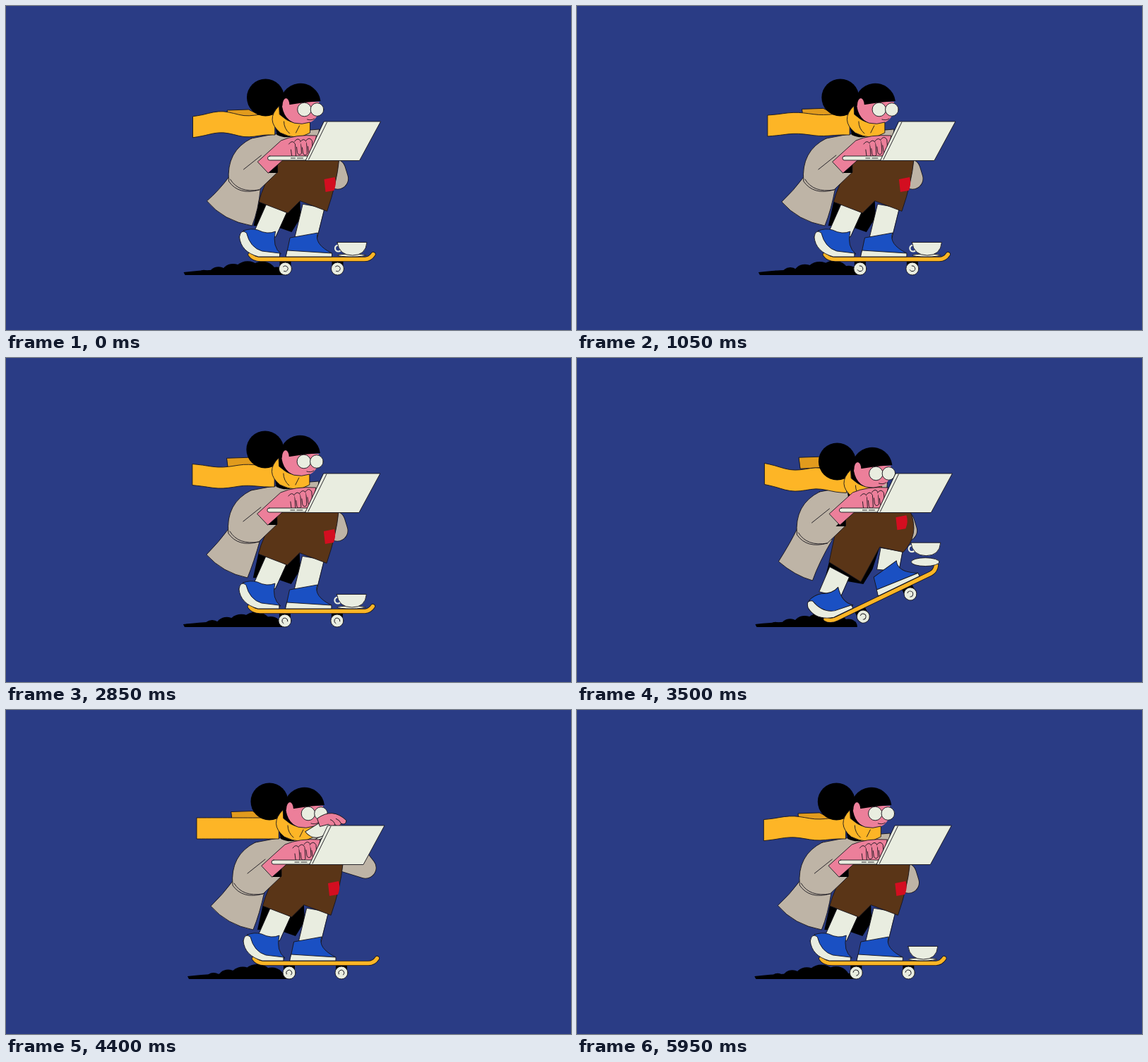
An HTML page that plays this animation: 800x460 px, repeating every 6 s.

```html
<!DOCTYPE html>
<html lang="en">
<head>
<meta charset="utf-8">
<title>Skater with laptop</title>
<style>
html, body { margin: 0; width: 100%; height: 100%; overflow: hidden; background: #2a3c85; }
svg { display: block; width: 100%; height: 100%; }
.ink { stroke: #17151c; stroke-width: .9; stroke-linejoin: round; stroke-linecap: round; }
.coat { fill: #beb4a6; }
.skin { fill: #ec7f9a; }
.white { fill: #e9ede0; }
.blue { fill: #1a50c3; }
.gold { fill: #fdb526; }
.brown { fill: #5a3517; }
.red { fill: #d30e20; }
.line { fill: none; }
.limb { fill: none; stroke-linecap: round; stroke-linejoin: round; }
</style>
</head>
<body>
<svg viewBox="0 0 800 460">
  <defs><clipPath id="floor"><rect x="200" y="330" width="300" height="52"/></clipPath></defs>
  <rect width="800" height="460" fill="#2a3c85"/>
  <g id="all">
    <g id="smoke" clip-path="url(#floor)"><path d="M252 378 Q300 372 394 374 V382 H254Z"/></g>
    <g id="sleeve">
      <path id="sleeveInk" class="limb" stroke="#17151c" stroke-width="31"/>
      <path id="sleeveFill" class="limb" stroke="#beb4a6" stroke-width="29.4"/>
    </g>
    <path id="lining"/>
    <path id="flap" class="coat ink"/>
    <path id="sockBack" class="white ink"/>
    <path id="sockFront" class="white ink"/>
    <g id="board">
      <path d="M388 362h16v8h-16zM462 362h16v8h-16z"/>
      <g id="wheels"></g>
      <path id="deckInk" class="limb" stroke="#17151c" stroke-width="7"/>
      <path id="deckFill" class="limb" stroke="#fdb526" stroke-width="5.4"/>
      <path class="blue ink" d="M337 319 Q347 315 357 318 Q371 325 382 320 Q377 342 390 352 H356 Q340 342 337 319Z"/>
      <path class="white ink" d="M331 328 Q333 316 341 322 Q346 343 363 348 L388 351 V356 H358 Q333 349 331 328Z"/>
      <g id="shoe">
        <path class="blue ink" d="M403 329 Q420 326 442 322 Q436 338 462 351 L399 348Z"/>
        <path class="white ink" d="M399 347 L462 351 V356 H397Z"/>
      </g>
    </g>
    <path id="trousers" class="brown ink"/>
    <path id="patch" class="red" d="M451 246 L466 243 Q469 252 465 262 L453 264Z"/>
    <g id="body">
      <path class="coat ink" d="M348 188 Q396 178 444 175 L441 215 H385 V236 L359 261 Q330 269 316 249 Q312 206 348 188Z"/>
      <path class="line ink" d="M337 232 L362 212 M318 246 Q330 266 359 261"/>
      <path d="M371 237 L385 223 V237Z"/>
    </g>
    <path id="flutter" fill="#e19b1d" class="ink"/>
    <path id="tail" class="gold ink"/>
    <g id="head">
      <circle cx="368" cy="130" r="26.500"/>
      <path d="M378 148 L398 138 L412 180 Q402 191 384 183Z"/>
      <path class="skin" d="M391 136 H444 L442 154 Q436 168 416 168 Q392 164 391 136Z"/>
      <path d="M389 142 A28.500 28.500 0 0 1 446 135 Q425 136 403 140Z"/>
      <ellipse class="skin" cx="397" cy="141" rx="5" ry="10"/>
      <path class="line ink" d="M427 161 Q433 163 437 160"/>
      <circle class="white ink" cx="423" cy="147" r="9.800"/>
      <circle class="white ink" cx="441" cy="147" r="9.300"/>
      <path class="gold ink" d="M387 142 Q367 162 389 180 Q412 192 431 180 V165 Q408 173 388 154Z"/>
      <path class="line ink" d="M394 164 Q394 174 402 181 M416 170 L411 180"/>
    </g>
    <path id="forearm" class="limb" stroke="#ec7f9a" stroke-width="20"/>
    <g id="cup">
      <ellipse id="saucer" class="white ink" rx="20"/>
      <circle id="handle" class="line" cx="-19" cy="-1" r="4.500" stroke="#e9ede0" stroke-width="2.200"/>
      <path class="white ink" d="M-20.500 -9.500 H21.500 Q20 9 1 9 Q-18 9 -20.500 -9.500Z"/>
    </g>
    <g id="hand">
      <path class="skin ink" d="M-16 -8 Q8 -20 24 2 Q22 9 16 5 Q12 11 7 5 Q2 9 -2 3 L-14 4Z"/>
      <path class="line ink" d="M16 5 Q15 0 10 -3 M7 5 Q7 0 2 -3"/>
    </g>
    <g id="desk">
      <path class="skin ink" d="M357 221 L390 191 Q410 182 440 184 L434 214 H398 L372 237Z"/>
      <g id="fingers" class="skin ink"></g>
      <rect class="white ink" x="371" y="213" width="60" height="6" rx="3"/>
      <path class="line ink" d="M404 216 H410 M413 216 H421"/>
      <path class="white ink" d="M451 164 H531 L501 219.500 H425Z"/>
      <path class="line ink" d="M455 165 L429 218"/>
    </g>
  </g>
</svg>
<script>
const LOOP = 6000, STEP = 50, FLUTTER = 750, TAU = 2 * Math.PI;
const PIVOT = [396, 373], TILT = -26;
const $ = id => document.getElementById(id);
const attr = (id, name, v) => $(id).setAttribute(name, v);
const move = (id, x, y, rot = 0, [cx, cy] = [0, 0]) =>
  attr(id, 'transform', `translate(${x} ${y}) rotate(${rot} ${cx} ${cy})`);

const mix = (a, b, k) => a + (b - a) * k;
const part = (t, a, b) => Math.min(1, Math.max(0, (t - a) / (b - a)));
const ramp = (t, a, b) => { const k = part(t, a, b); return k * k * (3 - 2 * k); };
const bump = (t, a, b) => Math.sin(Math.PI * part(t, a, b));

const poly = pts => 'M' + pts.map(p => p.join(' ')).join('L') + 'Z';
const polar = (r, deg) => [r * Math.cos(deg * TAU / 360), r * Math.sin(deg * TAU / 360)];

// Smooth line through the midpoints
function wavy(pts) {
  let d = `${pts[0]}`;
  for (let i = 1; i < pts.length - 1; i++) {
    const [x, y] = pts[i], [u, v] = pts[i + 1];
    d += `Q${x} ${y} ${(x + u) / 2} ${(y + v) / 2}`;
  }
  return d + `L${pts[pts.length - 1]}`;
}

// Both ends of a trouser cuff
function cuff([x, y], width, deg) {
  const [dx, dy] = polar(width / 2, deg);
  return [[x + dx, y + dy], [x - dx, y - dy]];
}

function add(parent, tag, props = {}) {
  const el = document.createElementNS('http://www.w3.org/2000/svg', tag);
  for (const p in props) el.setAttribute(p, props[p]);
  return $(parent).appendChild(el);
}

const puffs = Array.from({ length: 6 }, () => add('smoke', 'ellipse', { cy: 381 }));
const fingers = Array.from({ length: 4 }, () => add('fingers', 'path'));
const hubs = [396, 470].map(x => {
  add('wheels', 'circle', { cx: x, cy: 373, r: 9, class: 'white ink' });
  return [x, add('wheels', 'path', { d: `M${x - 3} 370 a4 4 0 1 1 1 6.500`, class: 'line ink' })];
});
for (const id of ['deckInk', 'deckFill'])
  attr(id, 'd', 'M346.500 353 Q351 359.500 361 359.500 H508 Q516 359.500 520.500 352.500');

function drawSmoke(t) {
  puffs.forEach((el, i) => {
    const q = (i / puffs.length + t / 1500) % 1;
    const r = 26 * Math.pow(1 - q, .8) * Math.min(1, .4 + q * 2.5);
    el.setAttribute('cx', 384 - 124 * q);
    el.setAttribute('rx', r + 2);
    el.setAttribute('ry', r);
  });
}

function drawLegs(pop, lift, rise) {
  const onBoard = (x, y) => {
    const [c, s] = polar(1, TILT * pop), dx = x - PIVOT[0], dy = y - PIVOT[1];
    return [PIVOT[0] + 9 * pop + dx * c - dy * s, PIVOT[1] + lift + dx * s + dy * c];
  };
  const kneeY = mix(rise, lift, .4) * (1 - pop);
  const back = [379, 286 + 18 * pop + kneeY], front = [436 + 9 * pop, 284 - 12 * pop + kneeY];
  const backCuff = cuff(back, 44 + 9 * pop, 21 + 11 * pop);
  const frontCuff = cuff(front, 41 - 7 * pop, 21 - 9 * pop);
  const sock = (id, [x, y], ankle, deg) => {
    const [a, b] = cuff([x, y], 31, deg), [c, d] = cuff(ankle, 31, deg / 2);
    attr(id, 'd', poly([a, b, d, c]));
  };
  sock('sockBack', [back[0] + 5 - 13 * pop, back[1]], onBoard(367, 324), 28);
  sock('sockFront', front, onBoard(425 + 31 * pop, 329), 10);

  const hip = 219 + rise;
  attr('trousers', 'd', `M${385 - 14 * pop} ${hip} H472 Q${469 + 16 * pop} ${hip + 32} ${frontCuff[0]}` +
    `L${frontCuff[1]}L${backCuff[0]}L${backCuff[1]}Q364 ${hip + 36} ${385 - 14 * pop} ${hip}Z`);
  move('patch', 0, rise * .8 - 20 * pop);
  attr('lining', 'd', poly([[351, 312 + rise], backCuff[1], frontCuff[1],
    [418, 300 + kneeY], [405, 321 + kneeY], [385 - 20 * pop, 314 + rise]]));
}

function drawCoat(p, pop, rise) {
  const hem = Math.cos(TAU * (p - .15));
  const x = 346 + 5 * hem - 8 * pop, y = 312 + 4 * pop;
  attr('flap', 'd', `M${316 - 5 * pop} 243 Q302 262 285 ${278 - 2 * hem + 9 * pop}` +
    `Q308 ${y - 7} ${x} ${y} Q${x + 9} 290 361 258Z`);
  move('flap', 0, rise);
  move('body', -5 * pop, rise + 2 * pop);
}

function drawScarf(t, p, nod, hop) {
  const wave = Math.cos(TAU * p * p);
  const fly = -.85 * hop(t - 60) + 12 * bump(t, 3920, 4200);
  const edge = base => Array.from({ length: 9 }, (_, i) => {
    const s = i / 8;
    const y = base + 3.8 * wave * Math.cos(TAU * (s - 1) / .69) * Math.min(1, s * 3);
    return [381 - 116 * s, y + mix(nod / 2, fly, s)];
  });
  attr('tail', 'd', `M${wavy(edge(153))}L${wavy(edge(183).reverse())}Z`);
  attr('flutter', 'd', 'M314 141 L344 140 Q356 146 372 154 L316 157Z');
  move('flutter', 0, 3.5 * (1 + wave) + fly * .7);
}

// Thrown cup: toss, catch, sip, put back
function drawCup(t, pop, rise) {
  const toss = part(t, 3430, 4250), sip = ramp(t, 4250, 4400), down = ramp(t, 4850, 5180);
  const fall = 1 - toss * 820 / 520;
  const x = mix(mix(490 + 14 * Math.sin(Math.PI * toss) - 10 * toss, 441, sip), 490, down);
  const y = mix(mix(345 - 292 * (1 - fall * fall), 170, sip), 345, down);
  move('cup', x, y, -360 * ramp(t, 3500, 4200) - 32 * sip * (1 - down));
  attr('saucer', 'ry', 2 + 4 * pop);
  attr('saucer', 'cy', 9 + 9 * pop);
  attr('handle', 'opacity', 1 - sip);

  const reach = ramp(t, 3980, 4230) - ramp(t, 5260, 5500), up = reach * (1 - down), low = reach * down;
  const hand = [mix(456, x + 12 - 2 * down, reach), mix(200, y - 11, reach)];
  const elbow = [470 + 34 * up - 9 * low, 245 - 21 * up - 8 * low];
  const at = k => `${mix(elbow[0], hand[0], k)} ${mix(elbow[1], hand[1], k)}`;
  for (const id of ['sleeveInk', 'sleeveFill'])
    attr(id, 'd', `M446 206 L${elbow} L${at(.28 - .26 * low)}`);
  move('sleeve', -4 * pop, rise);
  attr('forearm', 'd', `M${at(.35 - .2 * low)} L${hand}`);
  for (const id of ['forearm', 'hand']) attr(id, 'opacity', reach > 0 ? 1 : 0);
  move('hand', ...hand, -10 * (1 - down));
}

function drawTyping(t) {
  fingers.forEach((el, i) => {
    const tap = 2.2 * Math.max(0, Math.sin(TAU * (t / 300 + i * .29)));
    el.setAttribute('d', `M${401 + i * 8} ${196 - i * 1.5 - tap} q5 -7 9 0 l1 17 q-4 4 -6 -1 l-1 -8`);
  });
}

function draw(t) {
  const p = t % FLUTTER / FLUTTER;
  const hop = time => 54 * bump(time, 3500, 3920);
  const pop = bump(t, 3350, 3680);
  const land = 8 * bump(t, 3900, 4120);
  const lift = -6 * pop - hop(t);
  const rise = land - .6 * hop(t);
  const nod = 17 * bump(t, 3300, 3680) + rise;

  move('all', 2 + 3.2 * Math.cos(TAU * (t - 1300) / 3300), 0);
  move('board', 9 * pop, lift, TILT * pop, PIVOT);
  move('shoe', 31 * pop, 0);
  hubs.forEach(([x, el]) => el.setAttribute('transform', `rotate(${t * .72} ${x} 373)`));
  move('head', 0, nod);
  move('desk', 0, rise * .8);
  drawSmoke(t);
  drawLegs(pop, lift, rise);
  drawCoat(p, pop, rise);
  drawScarf(t, p, nod, hop);
  drawCup(t, pop, rise);
  drawTyping(t);
}

const start = performance.now();
function tick() {
  const t = (performance.now() - start) % LOOP;
  draw(Math.floor(t / STEP) * STEP);
  requestAnimationFrame(tick);
}
tick();
</script>
</body>
</html>
```
